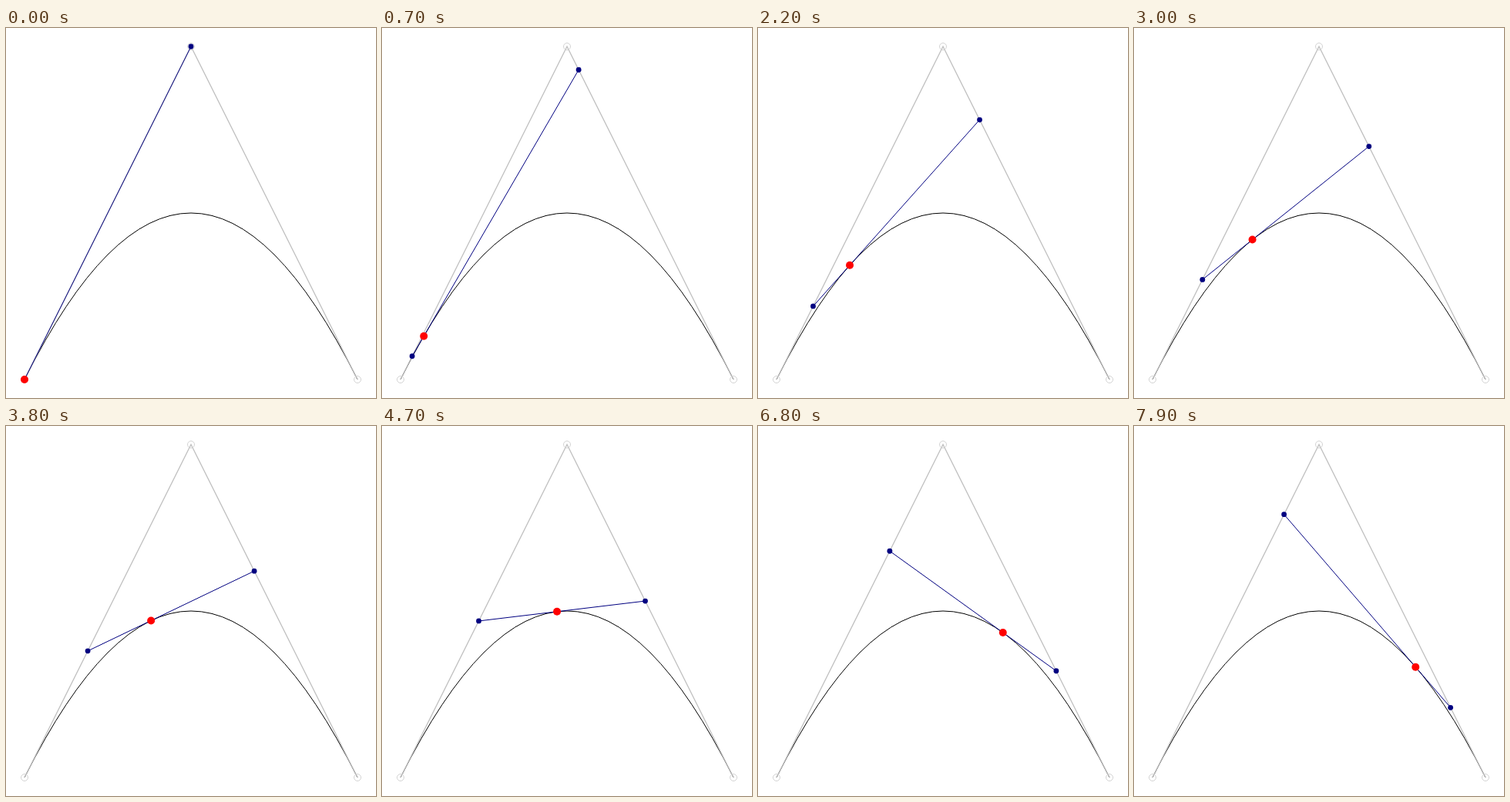
An HTML page for the animation above (8000 ms loop, 480x480 px).

```html
<!DOCTYPE html>
<html lang="en">
<head>
<meta charset="utf-8">
<title>Quadratic curve construction</title>
<style>
  html, body { margin: 0; width: 100%; height: 100%; overflow: hidden; background: #fff; }
  svg { display: block; width: 100%; height: 100%; }
  .line { fill: none; stroke-width: 1; }
  .ring { fill: none; stroke: #d3d3d3; stroke-width: 1; }
  .dot { fill: #000080; }
</style>
</head>
<body>
<svg viewBox="0 0 480 480">
  <path class="line" stroke="#000" stroke-width="1" d="M24 456Q240 24 456 456"/>
  <path class="line" stroke="#c0c0c0" style="stroke-width:1.3" d="M24 456L240 24L456 456"/>
  <circle class="ring" cx="24" cy="456" r="4.5"/>
  <circle class="ring" cx="240" cy="24" r="4.5"/>
  <circle class="ring" cx="456" cy="456" r="4.5"/>
  <line id="tangent" class="line" stroke="#000080"/>
  <circle id="left" class="dot" r="3.4"/>
  <circle id="right" class="dot" r="3.4"/>
  <circle id="pen" fill="#f00" r="5"/>
</svg>
<script>
  const LOOP = 8000, STEP = 100, STEPS_PER_CURVE = 100;
  const start = [24, 456], control = [240, 24], end = [456, 456];
  const [tangent, left, right, pen] =
    ["tangent", "left", "right", "pen"].map(id => document.getElementById(id));

  const mix = (a, b, t) => a.map((v, i) => v + (b[i] - v) * t);

  function place(el, [x, y], xName = "cx", yName = "cy") {
    el.setAttribute(xName, x);
    el.setAttribute(yName, y);
  }

  function draw(ms) {
    const t = Math.floor((ms % LOOP) / STEP) / STEPS_PER_CURVE;
    const a = mix(start, control, t);
    const b = mix(control, end, t);
    place(tangent, a, "x1", "y1");
    place(tangent, b, "x2", "y2");
    place(left, a);
    place(right, b);
    place(pen, mix(a, b, t));
  }

  const begin = performance.now();
  function tick(now) {
    draw(Math.max(0, now - begin));
    requestAnimationFrame(tick);
  }
  draw(0);
  requestAnimationFrame(tick);
</script>
</body>
</html>
```
